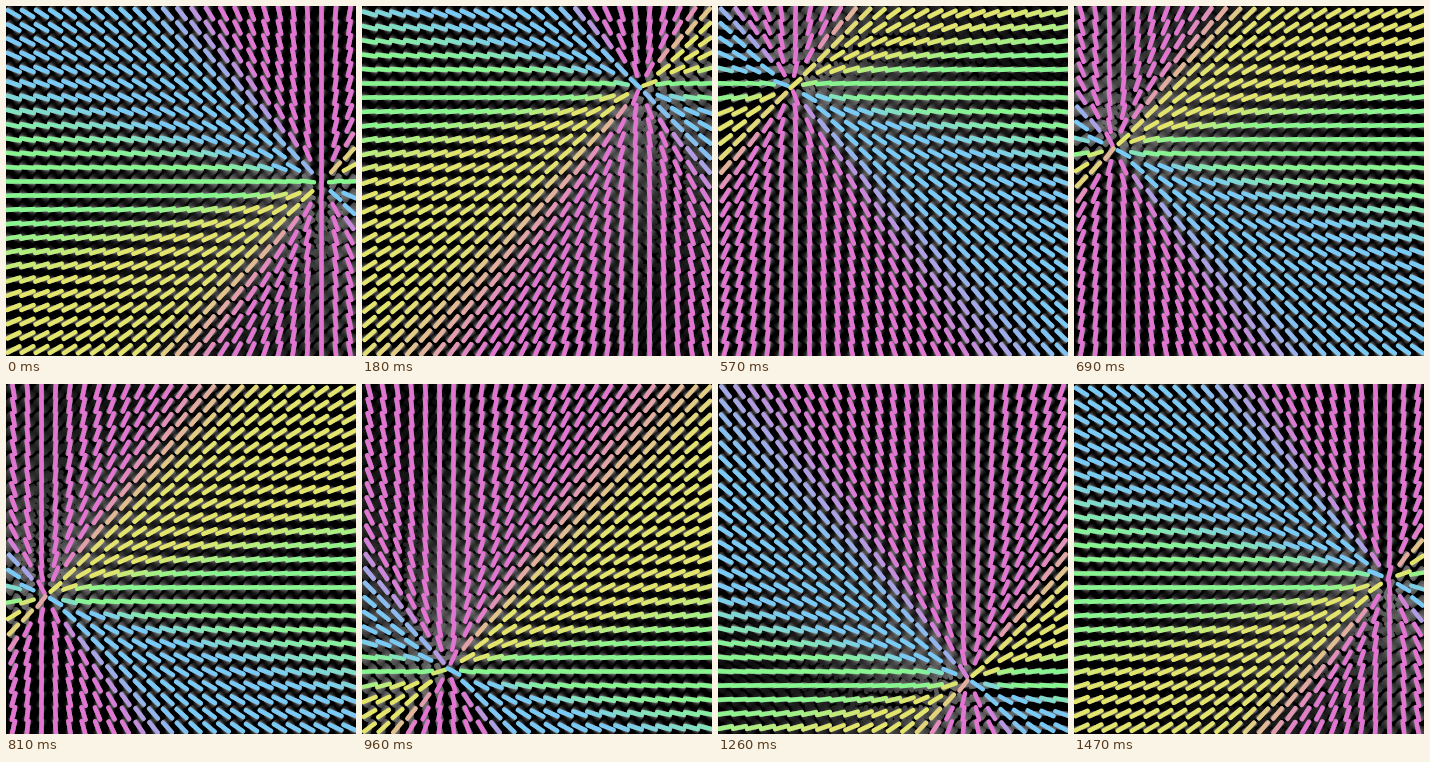
Recreate the animation shown at these times as an HTML page with a canvas. Size 350 by 350 pixels, loop 1.5 s.

```html
<!DOCTYPE html>
<html lang="en">
<head>
<meta charset="utf-8">
<title>Needle field</title>
<style>
html, body { margin: 0; width: 100%; height: 100%; overflow: hidden; background: #000; }
canvas { display: block; width: 350px; height: 350px; }
</style>
</head>
<body>
<canvas id="stage" width="350" height="350"></canvas>
<script>
const ctx = document.getElementById('stage').getContext('2d');
const SIZE = 350, PITCH = 14, FIRST = 7.5, HALF = 6.5, WIDTH = 4.5;
const LOOP = 1500, STEP = 30, COUNT = LOOP / STEP;
const HUB_X = 175.5, HUB_Y = 177, ORBIT = 140;
const TRAIL = 16, FADE = 0.86, GLOW = 125;

const GREEN = [136, 244, 144];
const BLUE = [122, 200, 244];
const PINK = [226, 116, 210];
const YELLOW = [226, 228, 108];

const smooth = (a, b, x) => {
  const t = Math.min(1, Math.max(0, (x - a) / (b - a)));
  return t * t * (3 - 2 * t);
};
const mix = (p, q, t) => p.map((v, i) => Math.round(v + (q[i] - v) * t));

// Colour follows the tilt of the needle, from -90 to 90 degrees.
function tint(dx, dy) {
  const tilt = dx ? Math.atan(dy / dx) * 180 / Math.PI : 90;
  const steep = Math.abs(tilt);
  const side = tilt > 0 ? BLUE : YELLOW;
  const c = mix(mix(GREEN, side, smooth(6, 21, steep)), PINK, smooth(41, 62, steep));
  return `rgb(${c})`;
}

function target(step) {
  const a = step / COUNT * 2 * Math.PI;
  return [HUB_X + ORBIT * Math.cos(a), HUB_Y - ORBIT * Math.sin(a)];
}

function eachNeedle(step, visit) {
  const [cx, cy] = target(step);
  for (let y = FIRST; y < SIZE; y += PITCH) {
    for (let x = FIRST; x < SIZE; x += PITCH) {
      const dx = cx - x, dy = cy - y, d = Math.hypot(dx, dy) || 1;
      visit(x, y, dx / d, dy / d);
    }
  }
}

function addLine(x, y, ux, uy) {
  ctx.moveTo(x - ux * HALF, y - uy * HALF);
  ctx.lineTo(x + ux * HALF, y + uy * HALF);
}

function draw(step) {
  ctx.fillStyle = '#000';
  ctx.fillRect(0, 0, SIZE, SIZE);
  ctx.lineWidth = WIDTH;
  ctx.lineCap = 'round';

  for (let age = TRAIL; age > 0; age--) {
    const g = Math.round(GLOW * FADE ** age);
    ctx.strokeStyle = `rgb(${g},${g},${g})`;
    ctx.beginPath();
    eachNeedle(step - age, addLine);
    ctx.stroke();
  }

  eachNeedle(step, (x, y, ux, uy) => {
    ctx.strokeStyle = tint(ux, uy);
    ctx.beginPath();
    addLine(x, y, ux, uy);
    ctx.stroke();
  });
}

const start = performance.now();
let shown = -1;
function tick() {
  const t = Math.max(0, performance.now() - start) % LOOP;
  const step = Math.floor(t / STEP);
  if (step !== shown) draw(shown = step);
  requestAnimationFrame(tick);
}
tick();
</script>
</body>
</html>
```
